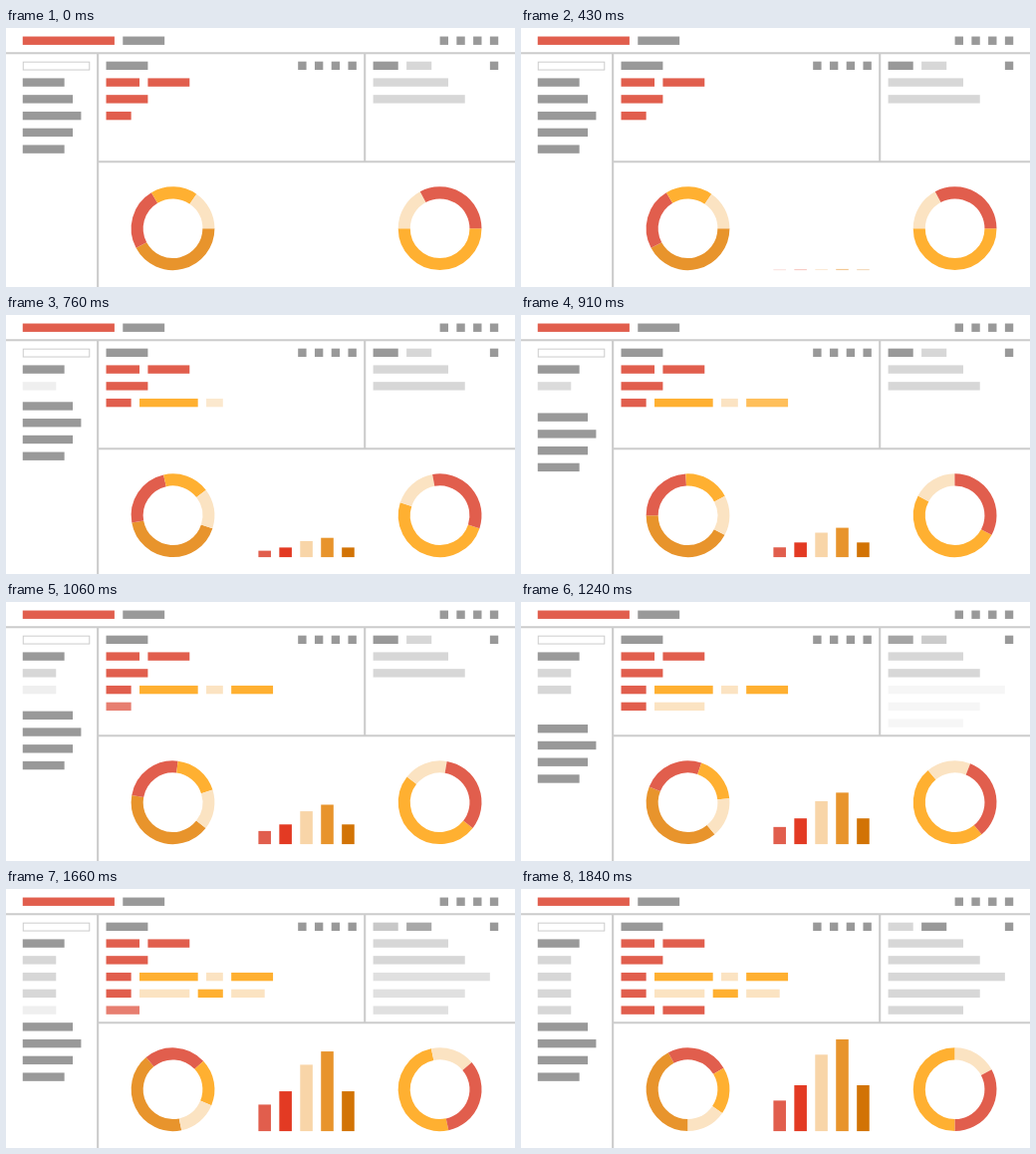
Recreate the animation shown at these times as an HTML page. Size 511x260 px, loop 2340 ms.

```html
<!DOCTYPE html>
<html lang="en">
<head>
<meta charset="utf-8">
<title>Dashboard wireframe</title>
<style>
  html, body { margin: 0; width: 100%; height: 100%; overflow: hidden; background: #fff; }
  svg { display: block; width: 511px; height: 260px; }
</style>
</head>
<body>
<svg id="stage" viewBox="0 0 61 31"></svg>
<script>
const LOOP = 2340, START = 430, STEP = 30, LAST = 47;
const RED = '#e15e4d', YELLOW = '#ffb031', ORANGE = '#e8942c', CREAM = '#fbe3c2';
const GREY = '#999', LIGHT = '#d7d7d7', LINE = '#ccc';

const stage = document.getElementById('stage');

function add(tag, attrs, parent = stage) {
  const el = document.createElementNS('http://www.w3.org/2000/svg', tag);
  for (const k in attrs) el.setAttribute(k, attrs[k]);
  parent.appendChild(el);
  return el;
}
const block = (x, y, w, fill, parent) => add('rect', { x, y, width: w, height: 1, fill }, parent);
const fade = (el, v) => el.setAttribute('opacity', v);
const ramp = (e, from, to) => Math.min(1, Math.max(0, (e - from) / (to - from)));

// Dividers
add('path', { d: 'M-1 3H62M11 3V32M43 3V16M11 16H62', stroke: LINE, 'stroke-width': .25, fill: 'none' });

// Header
block(2, 1, 11, RED);
block(14, 1, 5, GREY);
for (let x = 52; x < 60; x += 2) block(x, 1, 1, GREY);

// Sidebar
add('rect', { x: 2.06, y: 4.06, width: 7.94, height: .94, fill: '#fff', stroke: LINE, 'stroke-width': .12 });
block(2, 6, 5, GREY);
const menu = add('g', {});
[6, 7, 6, 5].forEach((w, i) => block(2, 8 + 2 * i, w, GREY, menu));
const items = [0, 1, 2, 3].map(i => block(2, 8 + 2 * i, 4, LIGHT));

// Editor panel
block(12, 4, 5, GREY);
for (let x = 35; x < 42; x += 2) block(x, 4, 1, GREY);
block(12, 6, 4, RED);
block(17, 6, 5, RED);
block(12, 8, 5, RED);
block(12, 10, 3, RED);
const words = [
  [16, 10, 7, YELLOW], [24, 10, 2, CREAM], [27, 10, 5, YELLOW],
  [12, 12, 3, RED], [16, 12, 6, CREAM], [23, 12, 3, YELLOW], [27, 12, 4, CREAM],
  [12, 14, 4, RED], [17, 14, 5, RED]
].map(a => block(...a));

// Tabs panel
const tabs = [block(44, 4, 3, GREY), block(48, 4, 3, LIGHT)];
block(58, 4, 1, GREY);
block(44, 6, 9, LIGHT);
block(44, 8, 11, LIGHT);
const lines = add('g', {});
[14, 11, 9].forEach((w, i) => block(44, 10 + 2 * i, w, LIGHT, lines));

// Ring charts: each slice is [end angle, colour], clockwise from the right
function ring(cx, cy, slices) {
  const g = add('g', {}), r = 4.28;
  const at = a => {
    const t = a * Math.PI / 180;
    return `${cx + r * Math.cos(t)} ${cy + r * Math.sin(t)}`;
  };
  let from = 0;
  for (const [to, stroke] of slices) {
    const large = to - from > 180 ? 1 : 0;
    add('path', { d: `M${at(from)}A${r} ${r} 0 ${large} 1 ${at(to)}`, fill: 'none', stroke, 'stroke-width': 1.44 }, g);
    from = to;
  }
  return a => g.setAttribute('transform', `rotate(${a} ${cx} ${cy})`);
}
const rings = [
  ring(20, 24, [[152, ORANGE], [239, RED], [304.5, YELLOW], [360, CREAM]]),
  ring(52, 24, [[180, YELLOW], [241.7, CREAM], [360, RED]])
];

// Bar chart
const chart = add('g', {});
const bars = [[1 / 3, RED], [1 / 2, '#e33a23'], [5 / 6, '#f8d5a8'], [1, ORANGE], [1 / 2, '#d27305']]
  .map(([part, fill], i) => ({
    full: 11 * part,
    el: add('rect', { x: 30.25 + 2.5 * i, width: 1.5, fill }, chart)
  }));

const mix = v => {
  const c = Math.round(153 + 62 * v);
  return `rgb(${c},${c},${c})`;
};

function draw(ms) {
  const e = Math.min(LAST, Math.floor((ms - START) / STEP));
  const grow = ramp(e, 2, LAST);
  const swap = ramp(e, 22, LAST);

  menu.setAttribute('transform', `translate(0 ${8 * ramp(e, 2, 32)})`);
  items.forEach((el, i) => fade(el, ramp(e, 7 + 10 * i, 17 + 10 * i)));
  words.forEach((el, i) => fade(el, ramp(e, 2 + 5 * i, 7 + 5 * i)));

  tabs[0].setAttribute('fill', mix(swap));
  tabs[1].setAttribute('fill', mix(1 - swap));
  fade(lines, swap);

  rings.forEach(turn => turn(90 * grow));

  fade(chart, e < 0 ? 0 : ramp(e, -2, 2));
  for (const { el, full } of bars) {
    const h = full * (.013 + .987 * grow);
    el.setAttribute('y', 29 - h);
    el.setAttribute('height', h);
  }
}

const begin = performance.now();
function tick() {
  draw((performance.now() - begin) % LOOP);
  requestAnimationFrame(tick);
}
draw(0);
requestAnimationFrame(tick);
</script>
</body>
</html>
```
